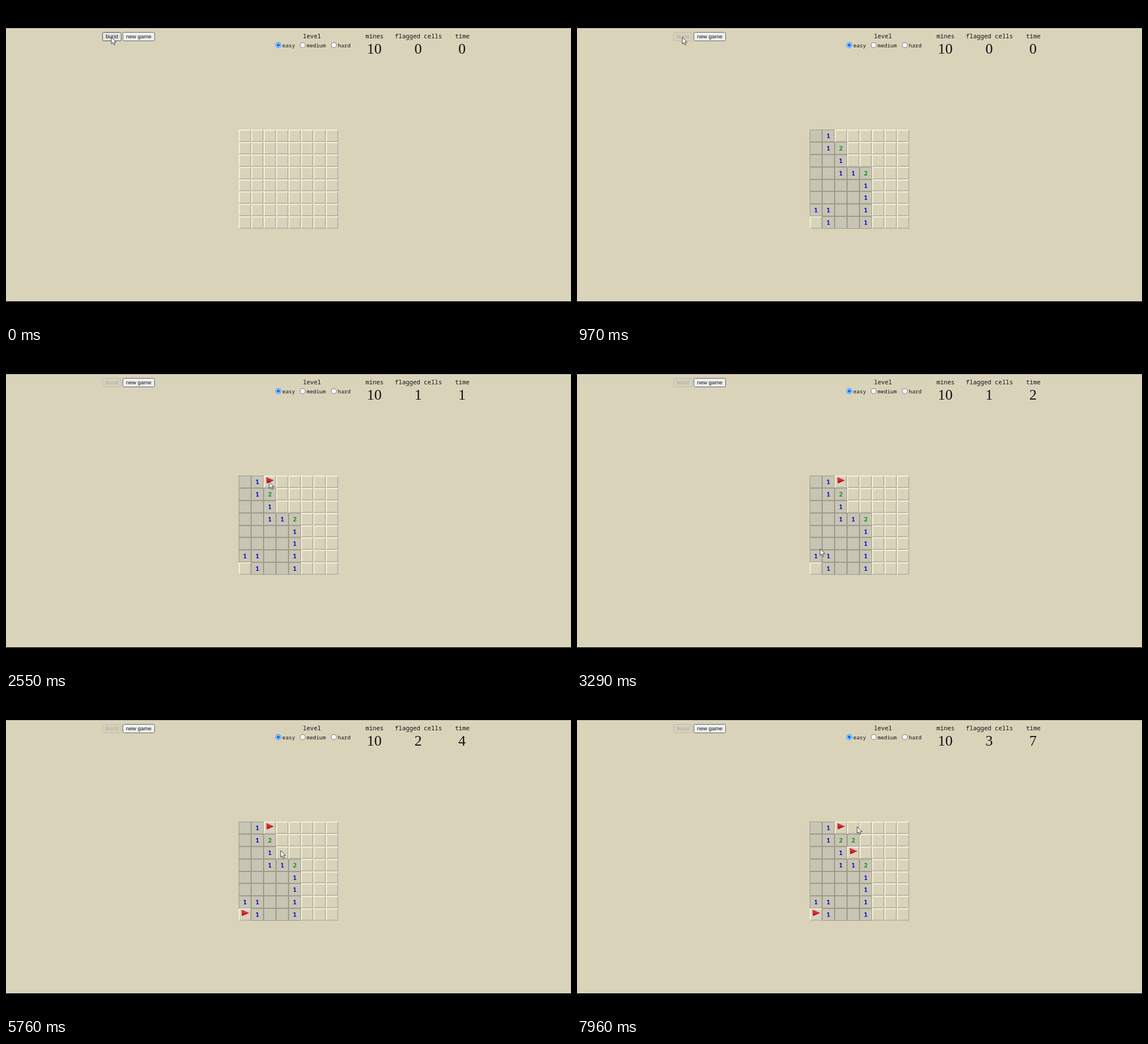
An HTML page with a canvas that plays this animation: 998x561 px, repeating every 8000 ms.

```html
<!DOCTYPE html>
<html lang="en">
<head>
<meta charset="utf-8">
<title>Mine field</title>
<style>
html, body { margin: 0; width: 100%; height: 100%; overflow: hidden; background: #000; }
canvas { display: block; }
</style>
</head>
<body>
<canvas id="stage" width="998" height="561"></canvas>
<script>
const ctx = document.getElementById('stage').getContext('2d');
const LOOP = 8000, STEP = 122.4;
const GAME_START = 790;
const MONO = '"Noto Sans Mono", monospace';
const SANS = '"Liberation Sans", Arial, sans-serif';
const SERIF = '"Liberation Serif", Times, serif';
const SAND = '#d9d3ba';

// '.' is covered, ' ' is open and empty
const board = [
  ' 1......', ' 12.....', '  1.....', '  112...',
  '    1...', '    1...', '11  1...', '.1  1...'
];
const flags = [
  { col: 2, row: 0, at: 2300 },
  { col: 0, row: 7, at: 4520 },
  { col: 3, row: 2, at: 5990 }
];
const lateCell = { col: 3, row: 1, at: 6950, value: '2' };

// time, x, y of the pointer tip
const path = [
  [0, 186, 55], [1050, 186, 55], [1841, 455, 226], [2100, 464, 228],
  [2560, 465, 229], [3310, 429.5, 347], [3700, 422, 376.5], [4650, 421.5, 376.5],
  [5500, 485, 269], [6250, 486, 269], [6650, 488, 248], [7200, 488, 248],
  [7800, 495, 227], [8000, 495, 227]
];

const colX = col => 411.4 + col * 21.9;
const rowY = row => 218.3 + row * 21.82;

function pointerAt(t) {
  const i = path.findIndex(p => p[0] > t);
  const [t0, x0, y0] = path[i - 1], [t1, x1, y1] = path[i];
  const u = (t - t0) / (t1 - t0), k = u * u * (3 - 2 * u);
  return [x0 + (x1 - x0) * k, y0 + (y1 - y0) * k];
}

function text(str, x, y, font, color = '#111', align = 'center') {
  ctx.font = font;
  ctx.fillStyle = color;
  ctx.textAlign = align;
  ctx.fillText(str, x, y);
}

function polygon(points, fill) {
  ctx.beginPath();
  points.forEach(([x, y]) => ctx.lineTo(x, y));
  ctx.closePath();
  ctx.fillStyle = fill;
  ctx.fill();
}

function disc(x, y, r, fill) {
  ctx.beginPath();
  ctx.arc(x, y, r, 0, 7);
  ctx.fillStyle = fill;
  ctx.fill();
}

function button(label, x, w, fill, border, color) {
  ctx.beginPath();
  ctx.roundRect(x + .5, 46.5, w - 1, 15, 2);
  ctx.fillStyle = fill;
  ctx.fill();
  ctx.strokeStyle = border;
  ctx.lineWidth = 1;
  ctx.stroke();
  text(label, x + w / 2, 57.4, '9.75px ' + SANS, color);
}

function radio(label, x, checked) {
  disc(x, 69, 5, checked ? '#0075ff' : '#777');
  disc(x, 69, 4, '#fff');
  if (checked) disc(x, 69, 3, '#0075ff');
  text(label, x + 7, 73.3, '9.4px ' + MONO, '#111', 'left');
}

function counter(label, value, x) {
  text(label, x, 57.3, '10.7px ' + MONO);
  text(value, x - .4, 84, '26px ' + SERIF);
}

function cell(col, row, value) {
  const x = Math.round(colX(col)), y = Math.round(rowY(row));
  const w = Math.round(colX(col + 1)) - x, h = Math.round(rowY(row + 1)) - y;
  if (value === '.') {
    ctx.fillStyle = '#b8b7a8';
    ctx.fillRect(x, y, w, h);
    polygon([[x, y], [x + w, y], [x + w - 2, y + 2], [x + 2, y + h - 2], [x, y + h]], '#f4efd6');
    ctx.fillStyle = SAND;
    ctx.fillRect(x + 2, y + 2, w - 4, h - 4);
    return;
  }
  ctx.fillStyle = '#9c9a8a';
  ctx.fillRect(x, y, w, h);
  ctx.fillStyle = '#c8c5b4';
  ctx.fillRect(x + 1, y + 1, w - 2, h - 2);
  if (value !== ' ') {
    text(value, x + w / 2, y + 15, '600 11px ' + MONO, value === '1' ? '#1010bd' : '#159015');
  }
}

function flag({ col, row }) {
  const x = colX(col) + 10.9, y = rowY(row) + 10.8;
  polygon([[x - 6, y - 8], [x + 7, y - 2.5], [x - 5.5, y + 3]], '#b5121f');
  polygon([[x - 6, y - 8], [x + 7, y - 2.5], [x - 5.8, y - 1.5]], '#e12b3c');
}

function pointer([x, y]) {
  ctx.save();
  ctx.translate(x, y);
  ctx.scale(1.08, 1.08);
  polygon([[0, 0], [0, 11], [2.5, 8.8], [4.2, 12.7], [6, 11.9], [4.4, 8.1], [7.8, 8]], '#fff');
  ctx.strokeStyle = '#222';
  ctx.lineWidth = .8;
  ctx.stroke();
  ctx.restore();
}

function draw(t) {
  ctx.fillStyle = '#000';
  ctx.fillRect(0, 0, 998, 561);
  ctx.fillStyle = SAND;
  ctx.fillRect(0, 39, 998, 482);

  const opened = t >= GAME_START;
  if (opened) button('burst', 170, 34, '#d4d0bb', '#c0bcaa', '#aaa797');
  else button('burst', 170, 34, '#e2e2e0', '#555', '#111');
  button('new game', 206, 57, '#efefef', '#666', '#111');

  text('level', 540.5, 57.3, '10.7px ' + MONO);
  radio('easy', 481, true);
  radio('medium', 524, false);
  radio('hard', 579, false);

  counter('mines', 10, 651);
  counter('flagged cells', flags.filter(f => t >= f.at).length, 728.5);
  counter('time', Math.max(0, Math.floor((t - GAME_START) / 1000)), 806);

  board.forEach((line, row) => [...line].forEach((value, col) =>
    cell(col, row, opened ? value : '.')));
  if (t >= lateCell.at) cell(lateCell.col, lateCell.row, lateCell.value);
  flags.filter(f => t >= f.at).forEach(flag);
  pointer(pointerAt(t));
}

// The screen advances in even steps
function tick() {
  const t = performance.now() % LOOP;
  const step = Math.floor((t - 250) / STEP + .17);
  draw(Math.max(0, 250 + step * STEP));
  requestAnimationFrame(tick);
}
tick();
</script>
</body>
</html>
```
